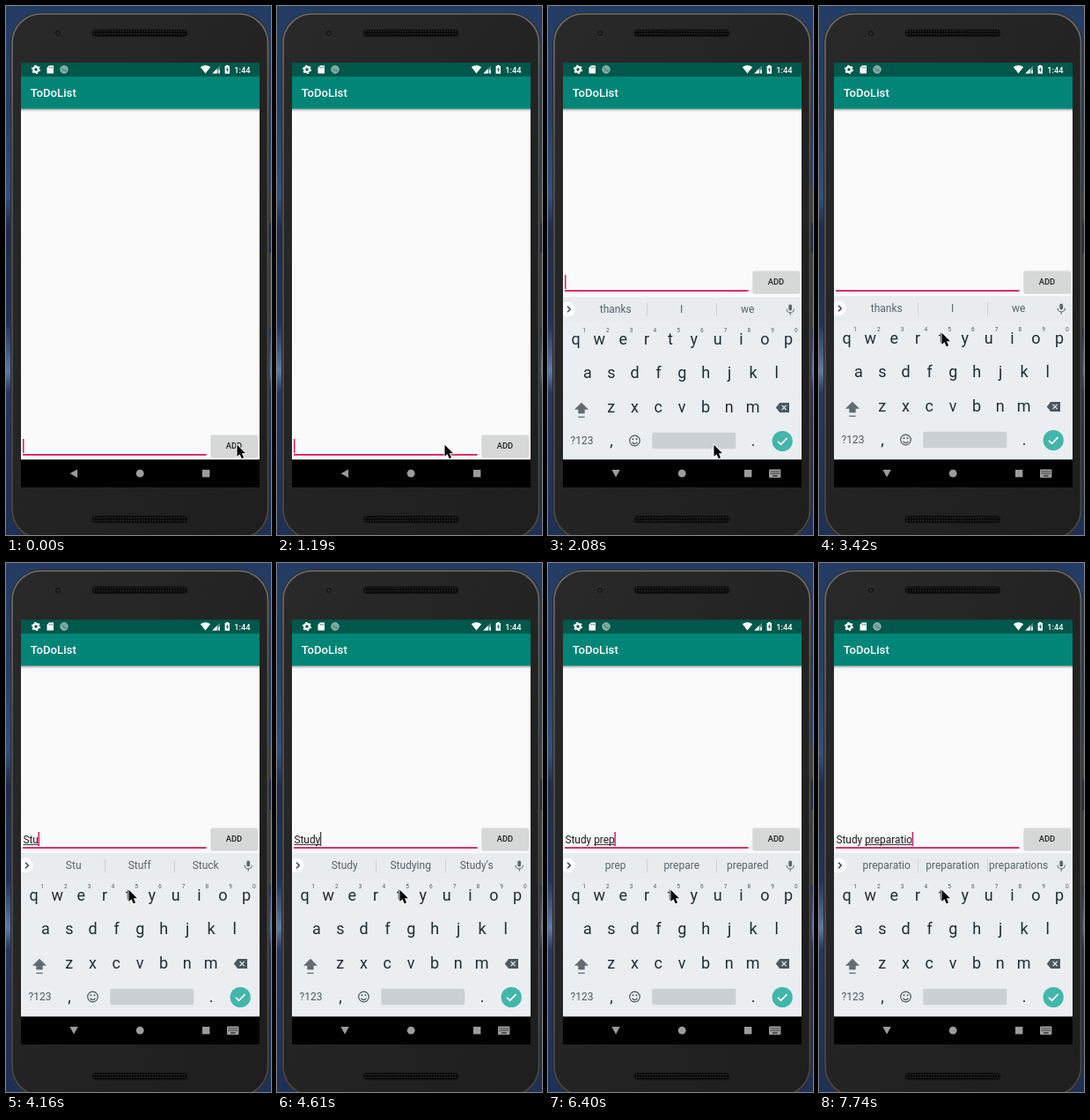
An HTML page for the animation above (8000 ms loop, 301x600 px).

```html
<!DOCTYPE html>
<html lang="en">
<head>
<meta charset="utf-8">
<title>To-do list</title>
<style>
  html, body { margin: 0; width: 100%; height: 100%; overflow: hidden; background: #1a2540; }
  svg { display: block; width: 100vw; height: 100vh; }
  text { font-family: Roboto, "Noto Sans", sans-serif; white-space: pre; }
  .mid { text-anchor: middle; }
  .hint { font-size: 12px; fill: #57636a; }
  .key { font-size: 18px; fill: #1f2d34; }
  .digit { font-size: 6.6px; fill: #4f5b62; }
</style>
</head>
<body>
<svg viewBox="0 0 301 600" preserveAspectRatio="none">
  <defs>
    <linearGradient id="sky" x2="0" y2="1">
      <stop offset="0" stop-color="#243c63"/>
      <stop offset=".2" stop-color="#263f68"/>
      <stop offset=".36" stop-color="#34507c"/>
      <stop offset=".42" stop-color="#1f2c49"/>
      <stop offset=".6" stop-color="#20325a"/>
      <stop offset=".69" stop-color="#5f79a5"/>
      <stop offset=".73" stop-color="#26385f"/>
      <stop offset="1" stop-color="#1d3056"/>
    </linearGradient>
    <linearGradient id="shell" x2="1" y2="1">
      <stop offset="0" stop-color="#292929"/>
      <stop offset="1" stop-color="#1e1e1e"/>
    </linearGradient>
    <linearGradient id="rim" x2="0" y2="1">
      <stop offset="0" stop-color="#6e6e6e"/>
      <stop offset=".3" stop-color="#545454"/>
      <stop offset="1" stop-color="#474747"/>
    </linearGradient>
    <linearGradient id="shade" x2="0" y2="1">
      <stop offset="0" stop-color="#000" stop-opacity=".3"/>
      <stop offset="1" stop-color="#000" stop-opacity="0"/>
    </linearGradient>
    <pattern id="mesh" width="3" height="3" patternUnits="userSpaceOnUse">
      <rect width="3" height="3" fill="#0b0b0b"/>
      <circle cx="1.5" cy="1.5" r=".7" fill="#303030"/>
    </pattern>
    <clipPath id="screen"><rect x="17" y="117" width="271" height="398"/></clipPath>
  </defs>

  <!-- desktop and phone -->
  <rect width="301" height="600" fill="url(#sky)"/>
  <path d="M300 209v36M300 280v86" stroke="#4c4c4c" stroke-width="2"/>
  <rect x="5" y="7" width="294.5" height="599" rx="35" fill="#2b2b2b"/>
  <rect x="7" y="9" width="290.5" height="595" rx="33" fill="url(#shell)" stroke="url(#rim)" stroke-width="1.7"/>
  <circle cx="59" cy="31" r="4.2" fill="#171717" stroke="#363636"/>
  <circle cx="59" cy="31" r="1.5" fill="#26303a"/>
  <rect x="98" y="27" width="108" height="7.5" rx="3.7" fill="url(#mesh)" stroke="#111"/>
  <rect x="98" y="578.5" width="108" height="7.5" rx="3.7" fill="url(#mesh)" stroke="#111"/>

  <!-- bars -->
  <rect x="17" y="65" width="271" height="481" fill="#fafafa"/>
  <rect x="17" y="64.2" width="271" height="15.8" fill="#00574b"/>
  <rect x="17" y="80" width="271" height="36.7" fill="#008577"/>
  <rect x="17" y="116.7" width="271" height="3.3" fill="url(#shade)"/>
  <text x="27.8" y="103" font-size="13.2" font-weight="500" fill="#fff">ToDoList</text>
  <g fill="#fff">
    <circle cx="34" cy="72" r="2.8" fill="none" stroke="#fff" stroke-width="2.2"/>
    <circle cx="34" cy="72" r="4.4" fill="none" stroke="#fff" stroke-width="1.4" stroke-dasharray="2.2 2.4"/>
    <path d="M49 67.5h5v9h-7.5v-6.5z"/>
    <path d="M49.3 69v1.6M51 69v1.6M52.6 69v1.6" stroke="#00574b" stroke-width=".7"/>
    <circle cx="66" cy="72" r="4.2" fill="#78a59e" stroke="#a9c6c1" stroke-width=".9"/>
    <path d="M63.5 70.5q3 4.5 5.5 3" fill="none" stroke="#3f7a71"/>
    <path d="M220.8 69.3Q226.5 65.3 232.2 69.3L226.5 76.4z"/>
    <path d="M243 67.8v8.6h-8.6z" opacity=".35"/>
    <path d="M239.7 71.1v5.3h-5.3z"/>
    <path d="M241.2 72.5h1.6v3.9h-1.6z"/>
    <path d="M250 67h2.6v1h1.4v8.7h-5.4V68h1.4z"/>
    <path d="M251.8 69.3l-1.9 3.3h1.2v2.6l1.9-3.4h-1.2z" fill="#00574b"/>
    <text x="259.2" y="75.6" font-size="9.3" font-weight="500">1:44</text>
  </g>

  <!-- input row -->
  <g id="row">
    <rect x="19" y="322.1" width="208.6" height="1.8" fill="#d81b60"/>
    <rect x="232.5" y="301.5" width="53.5" height="25" rx="2" fill="#000" opacity=".16"/>
    <rect x="232.5" y="300.5" width="53" height="24.7" rx="1.5" fill="#d6d7d7"/>
    <text x="259" y="316" class="mid" font-size="9.3" font-weight="500" fill="#1f1f1f">ADD</text>
    <text id="typed" x="19.4" y="318" font-size="11.9" fill="#1c1c1c"></text>
    <rect id="mark" y="319" height="1" fill="#333"/>
    <rect id="caret" y="305" width="1.5" height="16"/>
  </g>

  <!-- keyboard -->
  <g clip-path="url(#screen)">
    <g id="board">
      <rect x="17" y="329" width="271" height="188" fill="#e8ecef"/>
      <rect x="17" y="358" width="271" height="159" fill="#eaeef1"/>
      <circle cx="22.5" cy="343" r="8.3" fill="#fff"/>
      <path d="M22 339.7l3.3 3.3-3.3 3.3" fill="none" stroke="#37474f" stroke-width="1.5"/>
      <path d="M112.5 336v15M191.5 336v15" stroke="#cbd1d5"/>
      <g id="hints"></g>
      <rect x="273.3" y="337.5" width="3.8" height="7" rx="1.9" fill="#5d686e"/>
      <path d="M271 342.7a4.2 4.2 0 0 0 8.4 0M275.2 347v2.6" fill="none" stroke="#5d686e" stroke-width="1.1"/>
      <g id="keys"></g>
      <path d="M38 448.8l8 8h-4.3v4.4h-7.4v-4.4H30z" fill="#616c72"/>
      <path d="M34.3 465.2h7.4" stroke="#616c72" stroke-width="1.3"/>
      <path d="M263.2 449H274v11h-10.8l-4.4-5.5z" fill="#4b575e"/>
      <path d="M265.6 451.8l5 5.4M270.6 451.8l-5 5.4" stroke="#eaeef1" stroke-width="1.2"/>
      <text x="38.5" y="496.4" class="mid" font-size="12" fill="#4b575e">?123</text>
      <g fill="none" stroke="#4b575e" stroke-width="1.2">
        <circle cx="98.5" cy="492" r="5.8"/>
        <path d="M95.5 493.6q3 4 6 0"/>
      </g>
      <circle cx="96.5" cy="490.3" r="1" fill="#4b575e"/>
      <circle cx="100.5" cy="490.3" r="1" fill="#4b575e"/>
      <rect x="118.3" y="482.8" width="95" height="18.4" rx="2" fill="#cbd0d4"/>
      <circle cx="266.2" cy="492.5" r="11.6" fill="#42b6aa"/>
      <path d="M261 492.7l3.5 3.6 7-7.2" fill="none" stroke="#fff" stroke-width="1.6"/>
    </g>
  </g>

  <!-- navigation bar -->
  <rect x="17" y="514.4" width="271" height="31.6" fill="#000"/>
  <g fill="#9c9c9c">
    <path id="back" d="M72.7 530.3l8.4-4.7v9.4z"/>
    <circle cx="152.2" cy="530.2" r="4.4"/>
    <rect x="223" y="526" width="8.4" height="8.4"/>
    <g id="switcher">
      <rect x="251" y="525.5" width="13.4" height="9.4" rx="1"/>
      <path d="M252.8 528h10M252.8 530.3h10" stroke="#000" stroke-width="1.1" stroke-dasharray="1.2 1"/>
      <path d="M255 533h5.6" stroke="#000" stroke-width="1"/>
    </g>
  </g>

  <path id="pointer" d="M.5 .8v13.2l3-2.8 2.2 5 2.4-1-2.2-4.9h4.1z" fill="#000" stroke="#fff" stroke-width="1.8" paint-order="stroke"/>
</svg>
<script>
const LOOP = 8000;
const PINK = '#d81b60', DARK = '#4a4a4a';
const $ = id => document.getElementById(id);

// time, typed text, caret colour, suggestions
const START = 'thanks I we';
const STEPS = [
  [0, '', PINK, START],
  [450, '', '', START],
  [900, '', PINK, START],
  [1340, '', '', START],
  [1640, '', PINK, START],
  [2380, '', '', START],
  [2820, '', PINK, START],
  [3420, '', '', START],
  [3570, 'S', PINK, 'S So Sorry'],
  [3860, 'St', PINK, 'St Still Stay'],
  [4160, 'Stu', PINK, 'Stu Stuff Stuck'],
  [4460, 'Stud', PINK, 'Stud Study Studied'],
  [4610, 'Study', DARK, "Study Studying Study's"],
  [5200, 'Study', '', "Study Studying Study's"],
  [5350, 'Study ', PINK, 'and for the'],
  [5650, 'Study p', PINK, 'p place plans'],
  [5950, 'Study pr', PINK, 'pr pretty price'],
  [6100, 'Study pre', PINK, 'pre prep pretty'],
  [6400, 'Study prep', PINK, 'prep prepare prepared'],
  [6840, 'Study prepa', PINK, 'prepa prepare prepared'],
  [7140, 'Study prepar', PINK, 'prepar prepare prepared'],
  [7290, 'Study prepara', PINK, 'prepara preparation preparations'],
  [7440, 'Study preparati', PINK, 'preparati preparation preparations'],
  [7740, 'Study preparatio', PINK, 'preparatio preparation preparations']
];

// time, pointer position
const MOVES = [
  [0, 262, 497], [450, 254, 497], [600, 233, 497], [750, 208, 497],
  [900, 193, 497], [1190, 190, 497], [1490, 188, 497],
  [2670, 160, 428], [2820, 139, 370]
];

function label(parent, x, y, cls, str) {
  const el = document.createElementNS('http://www.w3.org/2000/svg', 'text');
  el.setAttribute('x', x);
  el.setAttribute('y', y);
  el.setAttribute('class', 'mid ' + cls);
  el.textContent = str;
  return $(parent).appendChild(el);
}

const hints = [76.7, 151.7, 226.7].map(x => label('hints', x, 347.2, 'hint', ''));
const GAP = 26.85;
[['qwertyuiop', 31.5, 382.6], ['asdfghjkl', 45, 421], ['zxcvbnm', 71.6, 460]]
  .forEach(([row, x, y]) => [...row].forEach((c, i) => label('keys', x + i * GAP, y, 'key', c)));
[...'1234567890'].forEach((c, i) => label('keys', 41.2 + i * 26.75, 369.2, 'digit', c));
label('keys', 72, 497.5, 'key', ',');
label('keys', 233, 497.5, 'key', '.');

const pen = document.createElement('canvas').getContext('2d');
function width(str) {
  pen.font = '11.9px Roboto, "Noto Sans", sans-serif';
  return pen.measureText(str).width;
}

const at = (table, t) => table.findLast(step => step[0] <= t);
const show = (id, on) => $(id).style.visibility = on ? 'visible' : 'hidden';
const shift = (id, x, y) => $(id).setAttribute('transform', `translate(${x} ${y})`);

function draw(t) {
  const [, str, caret, words] = at(STEPS, t);
  const [, px, py] = at(MOVES, t);
  const raised = t >= 1930;
  const cut = str.lastIndexOf(' ') + 1;
  const from = 19.4 + width(str.slice(0, cut));
  const end = 19.4 + width(str);

  $('typed').textContent = str;
  $('mark').setAttribute('x', from);
  $('mark').setAttribute('width', Math.max(0, end - from));
  $('caret').setAttribute('x', end - 0.4);
  $('caret').setAttribute('fill', caret || 'none');
  words.split(' ').forEach((w, i) => hints[i].textContent = w);

  shift('row', 0, raised ? 0 : 186);
  shift('board', 0, t < 2230 ? 1 : 0);
  show('board', t >= 2080);
  show('switcher', raised);
  $('back').setAttribute('transform', raised ? 'rotate(-90 77 530.2)' : '');
  shift('pointer', px, py);
}

const begin = performance.now();
function tick() {
  draw((performance.now() - begin) % LOOP);
  requestAnimationFrame(tick);
}
tick();
</script>
</body>
</html>
```
